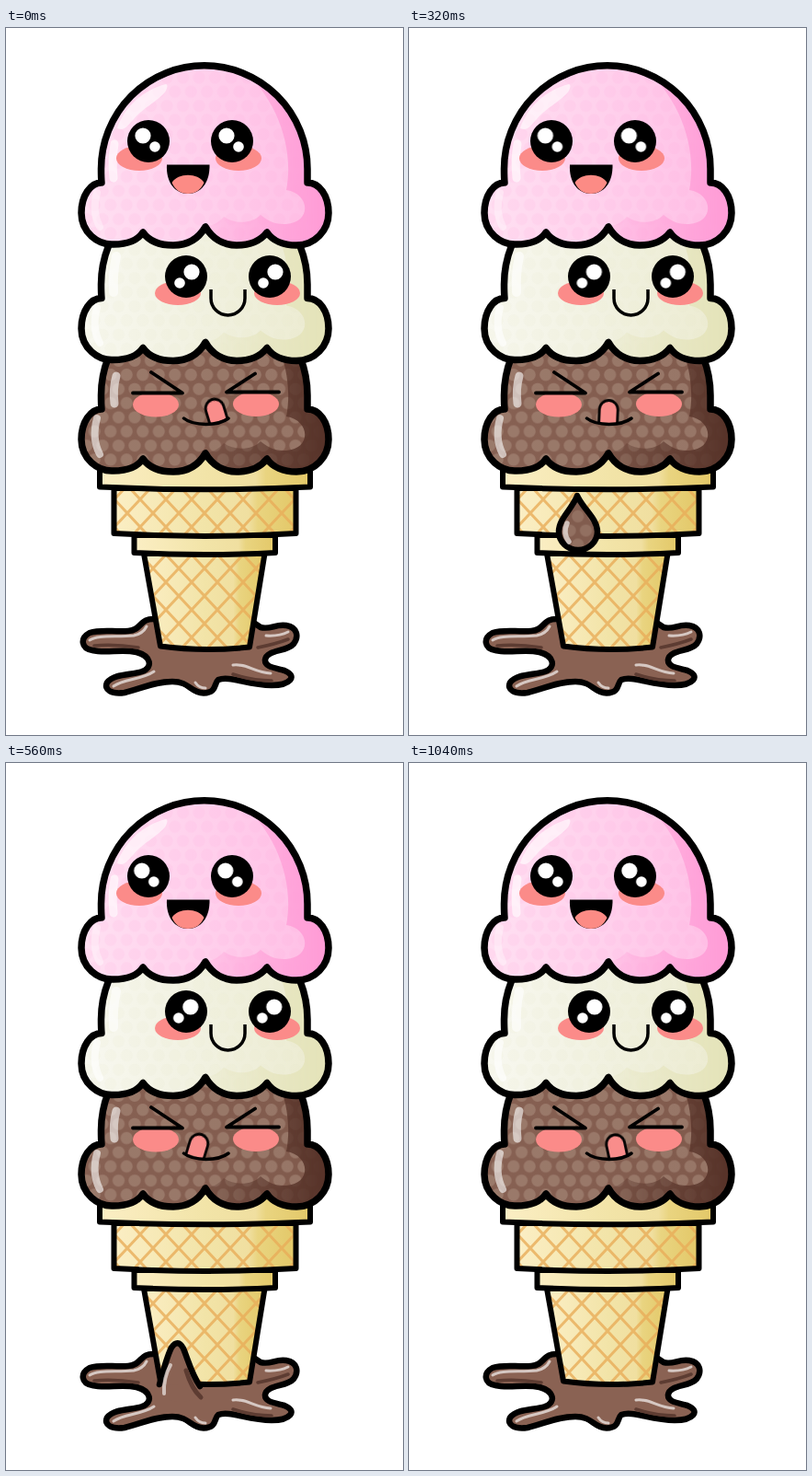
These frames come from a looping animation (432x768 px, 1120 ms). An HTML page:

```html
<!DOCTYPE html>
<html lang="en">
<head>
<meta charset="utf-8">
<title>Melting ice cream</title>
<style>
  html, body { margin: 0; width: 100%; height: 100%; overflow: hidden; background: #fff; }
  svg { display: block; width: 432px; height: 768px; }

  .line { fill: none; stroke: #000; stroke-linecap: round; stroke-linejoin: round; }
  .edge { stroke: #000; stroke-width: 7.5; stroke-linecap: round; stroke-linejoin: round; }
  .thin { stroke-width: 6.5; }
  .tier { stroke: #000; stroke-width: 6; stroke-linejoin: round; }
  .gloss { fill: none; stroke: #fff; stroke-linecap: round; stroke-opacity: var(--gloss, .6); }
  .blush { fill: #fb8b89; }
  .melt { fill: url(#melt); }
  .pool { fill: #8a6253; }
  .dark { fill: none; stroke: #5d3c32; stroke-width: 5; stroke-linecap: round; }

  /* Both halves of the loop move in seven held poses. */
  .tongue, .glint { animation: 1120ms infinite; animation-timing-function: steps(7, end); }
  .tongue { animation-name: lick; transform-origin: 218.5px 385px; }
  .glint { animation-name: glance; fill: #fff; }
  @keyframes lick {
    0%, 100% { transform: rotate(-17deg); }
    50% { transform: rotate(17deg); }
  }
  @keyframes glance {
    0%, 100% { transform: translateX(0); }
    50% { transform: translateX(-1.2px); }
  }

  /* Each melt pose is visible for one 80 ms slot. */
  .pose {
    visibility: hidden;
    animation: show 1120ms step-end infinite;
    animation-delay: calc((var(--n) - 14) * 80ms);
  }
  @keyframes show {
    0% { visibility: visible; }
    7.142857%, 100% { visibility: hidden; }
  }
</style>
</head>
<body>
<svg viewBox="0 0 432 768">
  <defs>
    <path id="shape" d="M104 168 C103.500 163 103.500 158 103.500 153 A112 112 0 0 1 328 153 C328 158 328 163 328 168
      C341 168 351 182 351 201 C351 220 336 236 316 236 C302 236 290 231 284 222 C277 231 266 236 251 236
      C236 236 224 228 217 216 C210 228 198 236 182 236 C168 236 156 232 149 222 C143 231 132 235 117 235
      C100 236 82 222 82 201 C82 182 92 168 104 168 Z"/>
    <clipPath id="inside"><use href="#shape"/></clipPath>

    <pattern id="dots" width="17.5" height="30.75" patternUnits="userSpaceOnUse">
      <g id="hex">
        <circle cx="8.750" cy="7.700" r="6.600"/>
        <circle cx="0" cy="23.100" r="6.600"/>
        <circle cx="17.500" cy="23.100" r="6.600"/>
      </g>
    </pattern>
    <pattern id="pinkDots" href="#dots"><use href="#hex" fill="#ffa6da" opacity=".14"/></pattern>
    <pattern id="creamDots" href="#dots"><use href="#hex" fill="#dfe0c4" opacity=".12"/></pattern>
    <pattern id="cocoaDots" href="#dots"><use href="#hex" fill="#b09384" opacity=".48"/></pattern>
    <pattern id="melt" href="#dots">
      <rect width="18" height="31" fill="#815c4e"/>
      <use href="#hex" fill="#b09384" opacity=".35"/>
    </pattern>

    <linearGradient id="pink">
      <stop offset="0" stop-color="#ffe0f2"/>
      <stop offset=".5" stop-color="#ffd0ec"/>
      <stop offset="1" stop-color="#ffbde5"/>
    </linearGradient>
    <linearGradient id="cream">
      <stop offset="0" stop-color="#f8f8f0"/>
      <stop offset=".5" stop-color="#f1f1e0"/>
      <stop offset="1" stop-color="#ecebd0"/>
    </linearGradient>
    <linearGradient id="cocoa">
      <stop offset="0" stop-color="#876153"/>
      <stop offset="1" stop-color="#805a4c"/>
    </linearGradient>
    <linearGradient id="fade" gradientUnits="userSpaceOnUse" x1="217" x2="345">
      <stop offset="0" stop-color="#fff" stop-opacity=".2"/>
      <stop offset="1" stop-color="#fff"/>
    </linearGradient>
    <mask id="shadeMask" maskUnits="userSpaceOnUse" x="70" y="30" width="300" height="220">
      <rect x="70" y="30" width="300" height="220" fill="url(#fade)"/>
    </mask>

    <g id="scoop">
      <use href="#shape" style="fill: var(--base)"/>
      <use href="#shape" style="fill: var(--dots)"/>
      <g clip-path="url(#inside)">
        <path mask="url(#shadeMask)" style="fill: var(--shade)" d="M252 40 C295 75 314 130 305 176 C331 180 333 211 305 213
          C292 214 283 208 277 203 C268 213 248 213 237 205 C231 212 224 215 217 215 V245 H360 V40 Z"/>
      </g>
      <use href="#shape" class="edge" fill="none"/>
    </g>

    <g id="glints">
      <circle cx="-6" cy="-6" r="8.600"/>
      <circle cx="7" cy="6" r="5.800"/>
    </g>

    <linearGradient id="wafer">
      <stop offset="0" stop-color="#fbeec4"/>
      <stop offset=".5" stop-color="#f2e4a8"/>
      <stop offset=".74" stop-color="#f0dfa0"/>
      <stop offset=".79" stop-color="#e9d480"/>
      <stop offset="1" stop-color="#e3c868"/>
    </linearGradient>
    <pattern id="waffle" width="28" height="30" x="6" y="2" patternUnits="userSpaceOnUse">
      <path d="M-3 -3.200 L31 33.200 M31 -3.200 L-3 33.200" stroke="#e9ad58" stroke-width="3" opacity=".8"/>
    </pattern>

    <path id="band" d="M117.500 500 H315.500 V549 Q216 555 117.500 549 Z"/>
    <path id="cone" d="M150 571 H281.500 L265 672.500 Q215 678 168 671.500 Z"/>
  </defs>

  <!-- puddle -->
  <path class="edge thin pool" d="M162 642 C145 641 148 654 133 655 C116 656 103 653 91 657
    C80 663 82 674 94 676 C110 680 124 674 142 678 C157 682 161 694 148 699 C136 703 118 701 110 711
    C106 719 115 724 129 722 C148 717 163 710 181 710 C200 710 200 722 215 722.500 C230 722 226 712 231 708
    C243 703 263 714 289 714 C309 714 318 704 303 698 C292 695 281 694 282 686 C284 675 305 678 313 669
    C319 661 317 651 305 649 C293 647 288 654 277 651 L268 645 Z"/>
  <g class="gloss" style="--gloss: .65; stroke-width: 3">
    <path d="M91 665 C100 659 120 662 139 660 Q149 658 153 650"/>
    <path d="M117 715 C128 707 148 708 161 699"/>
    <path d="M247 692 C262 690 270 700 288 701"/>
    <path d="M283 660 Q297 661 307 656"/>
    <path d="M206 711 Q210 717 217 717"/>
  </g>
  <path class="dark" style="stroke-width: 3.500" d="M96 671 Q118 669 144 673 M274 673 Q294 669 307 664 M247 702 Q268 709 289 709"/>

  <!-- cone -->
  <use href="#cone" fill="url(#wafer)"/>
  <use href="#cone" class="tier thin" fill="url(#waffle)"/>
  <path class="tier" fill="url(#wafer)" d="M139.500 551 H293 V570 Q216 574 139.500 570 Z"/>
  <use href="#band" fill="url(#wafer)"/>
  <use href="#band" class="tier" fill="url(#waffle)"/>
  <path class="tier" fill="url(#wafer)" d="M102 455 H331 V498.500 Q216 504 102 498.500 Z"/>

  <!-- chocolate scoop -->
  <g transform="translate(0 246)" style="--base: url(#cocoa); --dots: url(#cocoaDots); --shade: #573329"><use href="#scoop"/></g>
  <path class="gloss" stroke-width="9" d="M120 378 Q116 392 118 408"/>
  <path class="gloss" stroke-width="8" d="M99 424 Q93 446 102 463"/>

  <!-- chocolate drip and drop -->
  <g class="pose" style="--n: 1">
    <path class="edge melt" d="M150 468 C157 477 165 478 168 489 C171 507 199 507 202 489 C204 480 210 477 215 466"/>
    <path class="gloss" stroke-width="5" d="M174 481 Q175 489 178 493"/>
  </g>
  <g class="pose" style="--n: 2">
    <path class="edge melt" d="M150 468 C158 478 167 479 167 494 V517 A18 18 0 0 0 203 517 V494 C203 482 210 478 215 466"/>
    <path class="gloss" stroke-width="5.500" d="M174 499 V514 Q175 521 179 525"/>
  </g>
  <g class="pose" style="--n: 3">
    <path class="edge melt" d="M150 468 C160 480 174 480 174 496 C174 512 164 518 164 533 A20 20 0 0 0 204 533
      C204 518 193 512 193 496 C193 483 209 480 215 466"/>
    <path class="gloss" stroke-width="5.500" d="M173 524 Q169 537 177 545"/>
  </g>
  <g class="pose" style="--n: 4">
    <path class="edge thin melt" d="M183 508 C178 522 163 533 163 547 A21 20 0 0 0 205 547 C205 533 189 522 183 508 Z"/>
    <path class="gloss" stroke-width="5.500" d="M172 538 Q167 549 174 558"/>
  </g>
  <g class="pose" style="--n: 5">
    <path class="edge thin melt" d="M186 546 C185 580 171 604 171 627 A17.500 17 0 0 0 206 627 C206 604 189 580 186 546 Z"/>
    <path class="gloss" stroke-width="5" d="M182 599 Q175 619 179 631"/>
  </g>

  <!-- splash -->
  <g class="pose" style="--n: 6">
    <ellipse class="pool" cx="189" cy="684" rx="25" ry="11"/>
    <path class="edge thin pool" d="M165 675 C174 662 181 638 187 597 C192 638 198 662 213 677"/>
    <path class="dark" d="M193 658 Q199 678 209 688"/>
    <path class="gloss" stroke-width="4" d="M181 653 Q177 672 171 683"/>
  </g>
  <g class="pose" style="--n: 7">
    <ellipse class="pool" cx="190" cy="683" rx="22" ry="11"/>
    <path class="edge thin pool" d="M167 675 C171 660 177 641 180 635 Q187 625 193 636 C198 648 202 664 211 677"/>
    <path class="dark" d="M196 660 Q202 680 212 689"/>
    <path class="gloss" stroke-width="4" d="M179 654 Q171 668 172 685"/>
  </g>
  <g class="pose" style="--n: 8">
    <ellipse class="pool" cx="192" cy="683" rx="24" ry="11"/>
    <path class="edge thin pool" d="M166 673 C172 659 180 647 188 647 C199 647 206 663 219 678"/>
    <path class="dark" d="M203 672 Q208 684 217 689"/>
    <path class="gloss" stroke-width="3.500" d="M179 663 Q171 672 172 684"/>
  </g>
  <g class="pose" style="--n: 9">
    <ellipse class="pool" cx="194" cy="682" rx="28" ry="11"/>
    <path class="edge thin pool" d="M166 669 C174 664 184 660 196 660 C210 660 220 667 229 677"/>
    <path class="dark" d="M223 680 Q218 690 204 691"/>
    <path class="gloss" stroke-width="3" d="M176 671 Q169 676 166 683"/>
  </g>
  <g class="pose" style="--n: 10">
    <ellipse class="pool" cx="195" cy="682" rx="27" ry="9"/>
    <path class="edge thin pool" d="M167 671 Q196 658 228 677"/>
    <path class="dark" style="stroke-width: 3" d="M222 683 Q216 690 206 691"/>
  </g>
  <g class="pose" style="--n: 11">
    <ellipse class="pool" cx="195" cy="682" rx="24" ry="7"/>
    <path class="edge thin pool" d="M168 672 Q196 666 225 676"/>
  </g>

  <!-- chocolate face -->
  <ellipse class="blush" cx="163" cy="409" rx="25" ry="13.500"/>
  <ellipse class="blush" cx="272" cy="408.500" rx="25" ry="13.500"/>
  <path class="line" stroke-width="3.800" d="M138 396.500 H192 L158 374 M297 395.500 H240 L271 375.500"/>
  <path class="tongue line" style="fill: #f98d8b" stroke-width="2.800" d="M208.500 429 V414.500 A10 10 0 0 1 228.500 414.500 V429"/>
  <path class="line" stroke-width="3.500" d="M193.500 424 C204 432.500 231 432.500 242 424"/>

  <!-- vanilla scoop -->
  <g transform="translate(0 125.5)" style="--base: url(#cream); --dots: url(#creamDots); --shade: #e4e3b9"><use href="#scoop"/></g>
  <path class="gloss" stroke-width="10" d="M120 248 Q116 266 117 287"/>
  <path class="gloss" stroke-width="8" d="M99 304 Q93 325 102 342"/>
  <ellipse class="blush" cx="187" cy="288" rx="25" ry="13"/>
  <ellipse class="blush" cx="295" cy="288" rx="25" ry="13"/>
  <circle cx="196" cy="270" r="23"/>
  <circle cx="287" cy="270" r="23"/>
  <g class="glint">
    <use href="#glints" transform="translate(196 271) scale(-1 1)"/>
    <use href="#glints" transform="translate(287 271) scale(-1 1)"/>
  </g>
  <path class="line" stroke-width="3.500" style="stroke-linecap: butt" d="M223 284 V293.500 A18.500 18.500 0 0 0 260 293.500 V284"/>

  <!-- strawberry scoop -->
  <g style="--base: url(#pink); --dots: url(#pinkDots); --shade: #ff9cd6"><use href="#scoop"/></g>
  <path fill="#fff" opacity=".6" d="M174 61 C150 67 129 85 121 109 C129 113 133 105 139 99 C150 86 169 77 174 68 Q177 62 174 61 Z"/>
  <path class="gloss" stroke-width="9" d="M118 126 Q115 144 117 163"/>
  <path class="gloss" style="--gloss: .35" stroke-width="8" d="M99 179 Q93 199 102 216"/>
  <ellipse class="blush" cx="145" cy="141.500" rx="25" ry="13.500"/>
  <ellipse class="blush" cx="253" cy="141.500" rx="25" ry="13.500"/>
  <circle cx="155" cy="123" r="23"/>
  <circle cx="246" cy="123" r="23"/>
  <g class="glint">
    <use href="#glints" transform="translate(155 123)"/>
    <use href="#glints" transform="translate(246 123)"/>
  </g>
  <path d="M175 148.500 H221.500 C222 168 212 180 198 180 C184 180 174 168 175 148.500 Z"/>
  <path fill="#fc8b85" d="M180.500 168 C187 157 209 157 215.500 168 C212 176 206 180 198 180 C190 180 184 176 180.500 168 Z"/>
</svg>
</body>
</html>
```
